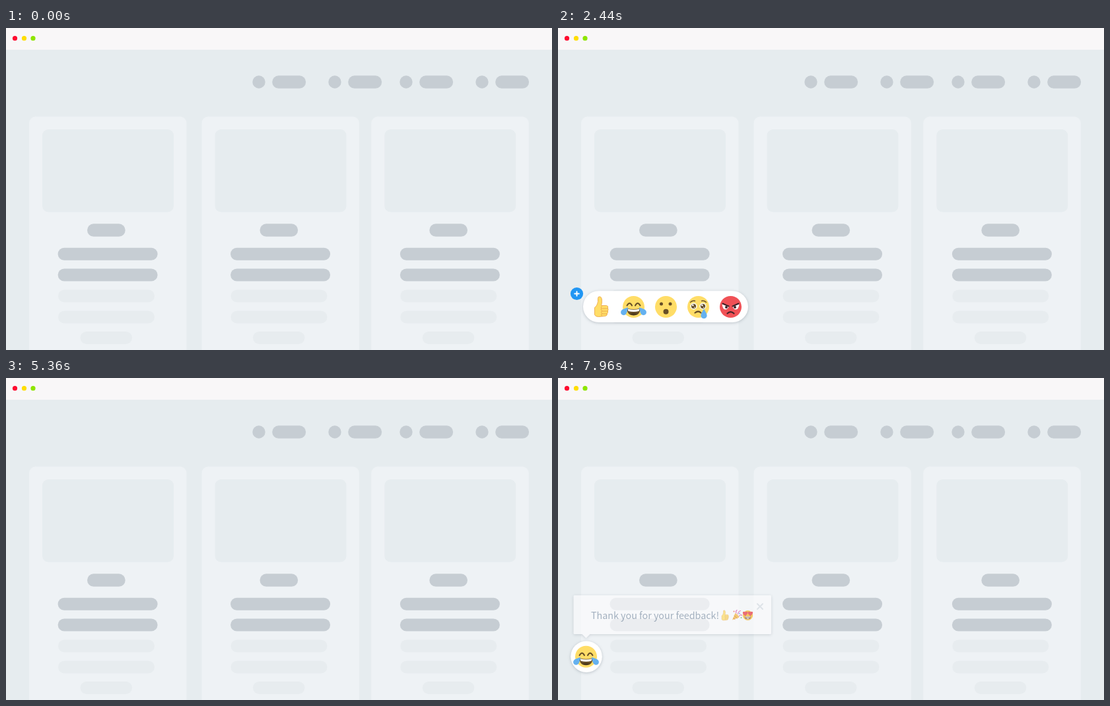
An HTML page that plays this animation: 827 by 489 pixels, repeating every 8 s.

```html
<!DOCTYPE html>
<html lang="en">
<head>
<meta charset="utf-8">
<title>Emoji feedback</title>
<style>
html, body { margin: 0; width: 100%; height: 100%; overflow: hidden; background: #e6ecef; }
svg { display: block; width: 827px; height: 489px; }
text { font-family: "Noto Sans CJK SC", "Noto Sans CJK JP", "Noto Sans CJK KR", "Noto Sans CJK", "Open Sans", sans-serif; font-size: 14.3px; fill: #8596a9; white-space: pre; }
.typed { font-size: 13px; }
.button { font-size: 12.2px; font-weight: 600; fill: #fff; }
.raised { filter: drop-shadow(0 1px 2px rgba(60, 75, 90, .28)); }
</style>
</head>
<body>
<svg id="stage" viewBox="0 0 827 489" xmlns="http://www.w3.org/2000/svg"></svg>
<script>
const LOOP = 8000, TICK = 40;
const NAME = 'Mia Lin', EMAIL = 'mialin@nomail.invalid';

const rect = (x, y, w, h, fill, r = 0) =>
  `<rect x="${x}" y="${y}" width="${w}" height="${h}" rx="${r}" fill="${fill}"/>`;
const pill = (x, y, w, h, fill) => rect(x, y, w, h, fill, h / 2);
const disc = (x, y, r, fill) => `<circle cx="${x}" cy="${y}" r="${r}" fill="${fill}"/>`;
const shape = (d, fill) => `<path d="${d}" fill="${fill}"/>`;
const line = (d, color, width = 1.6) =>
  `<path d="${d}" fill="none" stroke="${color}" stroke-width="${width}" stroke-linecap="round" stroke-linejoin="round"/>`;
const at = (x, y, body, scale = 1, id = '') =>
  `<g ${id && `id="${id}"`} transform="translate(${x} ${y}) scale(${scale})">${body}</g>`;
const label = (x, y, body, attrs = '') => `<text x="${x}" y="${y}" ${attrs}>${body}</text>`;

// Emoji are drawn around their own centre, about 33 px wide
const BROWN = '#664e27', INK = '#2c3038', FLAT = '#ffdd67', BLUE = '#65b1ef';
const face = (fill, body, r = 16.5) => disc(0, 0, r, fill) + body;
const heart = (x, y, scale, fill) =>
  at(x, y, shape('M0 7C-11 0-7-8 0-3.5C7-8 11 0 0 7Z', fill), scale);
const grin = (color, tongue) =>
  shape('M-10 2Q0 5 10 2Q10 13 0 13Q-10 13-10 2Z', color) +
  shape('M-9 3Q0 5.5 9 3L8 6.5Q0 8.5-8 6.5Z', '#fff') +
  shape('M-6 11Q0 7.5 6 11Q0 14.5-6 11Z', tongue);
const tearDrop = (x, y, scale, fill, turn = 0) =>
  `<g transform="translate(${x} ${y}) rotate(${turn}) scale(${scale})">${shape('M0-7C2-3 4.4 0 4.4 3A4.4 4.4 0 0 1-4.4 3C-4.4 0-2-3 0-7Z', fill)}</g>`;
const closedEyes = color => line('M-10-2Q-6-9-2.5-2M2.5-2Q6-9 10-2', color, 2);
const tears = fill => tearDrop(-13, 6, 1, fill, 42) + tearDrop(13, 6, 1, fill, -42);
const love = (fill, red, mouth, tongue, r) =>
  face(fill, heart(-8.5, -7, 1.2, red) + heart(8.5, -7, 1.2, red) + grin(mouth, tongue), r);
const laugh = (fill, color, tongue, drop, r) =>
  face(fill, closedEyes(color) + grin(color, tongue) + tears(drop), r);
const wetEyes = (color, r) => [-7, 7].map(x =>
  disc(x, -1, r, '#fff') + disc(x, -1, r * .72, color) + disc(x - 1.2, -2.4, 1.3, '#fff') + disc(x + 1.2, .8, .8, '#fff')).join('');
const cry = (fill, color, drop, r) =>
  face(fill, wetEyes(color, 5) + line('M-12-7Q-9-10-5-9M5-9Q9-10 12-7', color, 1.3) +
    line('M-5 9Q0 5 4 9', color, 2.2) + tearDrop(8.5, 10, 1.05, drop), r);
const glare = color =>
  shape('M-13-4L-3-1Q-4 4-8 4Q-12 4-13-4ZM13-4L3-1Q4 4 8 4Q12 4 13-4Z', '#fff') +
  disc(-6.5, .5, 2, color) + disc(6.5, .5, 2, color) + line('M-12-5L-3-1M12-5L3-1', color, 2);
const openEyes = (y, r) => disc(-7, y, r, BROWN) + disc(6.5, y, r, BROWN);

const thumb = () =>
  `<g stroke="#eba94f" stroke-width=".9" stroke-linejoin="round">` +
  shape('M-10 1C-7-1-6-4-5-8L-5-13Q-5-16-2-15.5Q1-15 1-9Q1-5 0-2L8-2Q11-1.5 10 2Q11 4 10 6Q10.5 9 9 10Q9 14 6 14L-4 15Q-9 15-10 12Z', FLAT) +
  `</g>` + line('M1 2.5H10M1 6.5H10M1 10.5H9M1-1Q-1 0 0 2Q-1 4 1 6Q-1 8 1 10Q-1 12 1 14', '#eba94f', 1);
const arm = () =>
  shape('M-13 10Q-11-3-9-12Q-4-16 1-11Q1-6-4-7L-4 2Q4-5 10 0Q18 7 14 13Q2 18-13 14Z', '#fdbd3b') +
  line('M-5 3Q-2 7 2 6', '#d98e22', 1.6);
const popper = () =>
  shape('M-14 15L-5-6Q5 0 7 7Z', '#f5b73c') + line('M-8 2L1 10M-11 9L-6 13', '#d9782c', 2) +
  line('M-2-6Q-5-11 0-15M3-3Q4-11 11-13M7 3Q11-3 15 1', '#d95bb0', 2.4) +
  disc(8, -5, 2, '#58a7e8') + disc(-9, -11, 2, '#ee5a54') + disc(13, 8, 2, '#67bd5b');

const SHINY = 'url(#gold)', loveSmall = love('#fbb829', '#ec3843', '#6b3821', '#fff');
const flatLaugh = laugh(FLAT, BROWN, '#4c3a1c', BLUE);
const sets = [
  [
    love(SHINY, '#f3223c', INK, '#ee4c5a', 17),
    laugh(SHINY, INK, '#ee4c5a', '#5cc4f2', 17),
    face(SHINY, disc(-7, -3, 5.8, '#fff') + disc(7, -3, 5.8, '#fff') + disc(-7, -3, 2.5, INK) + disc(7, -3, 2.5, INK) +
      line('M-12-10Q-9-13-5-12M5-12Q9-13 12-10', '#8c5a1c', 1.3) +
      `<ellipse cy="9" rx="5" ry="6" fill="${INK}"/>` + shape('M-3.5 12Q0 8 3.5 12Q0 16-3.5 12Z', '#ee4c5a'), 17),
    cry(SHINY, INK, '#4bbdf0', 17),
    face('url(#rage)', glare(INK) + at(0, 8, rect(-16, -5, 32, 10, INK, 2) +
      label(0, 3, '#%@$!', 'text-anchor="middle" style="font-size:8px;font-weight:700;fill:#fff"'), 1), 17)
  ],
  [
    love(FLAT, '#ee4655', BROWN, '#ff717f'),
    face(FLAT, openEyes(-4, 2.6) + line('M-8 5Q0 13 8 5', BROWN, 2)),
    face(FLAT, openEyes(-4, 2.6) + line('M-6 7H6', BROWN, 2)),
    face(FLAT, openEyes(-4, 2.6) + line('M-7 10Q0 3 7 10', BROWN, 2)),
    face('#f0575b', openEyes(-1, 2.6) + line('M-11-7L-4-4M11-7L4-4M-6 10Q0 4 6 10', '#40262c', 2))
  ],
  [
    thumb(),
    flatLaugh,
    face(FLAT, openEyes(-4.5, 2.5) + disc(0, 7.3, 4, BROWN)),
    cry(FLAT, BROWN, BLUE),
    face('#f05156', glare('#40242a') + line('M-5 10Q0 5 5 10', '#40242a', 2.2))
  ]
];

const slotX = i => 65.5 + 49 * i;
const slots = sets.map((set, s) => `<g id="set${s}">` + set.map((emoji, i) =>
  at(slotX(i) - (s ? 0 : 1), s ? 423.5 : 422.7, emoji, 1, `emoji${s}${i}`)).join('') + '</g>').join('');

const DARK = '#c6cdd3', PALE = '#e7ecef', CARD = '#eef2f5';
const card = x => at(x, 0,
  rect(35, 134.5, 238.5, 380, CARD, 10) + rect(55, 154, 199, 125.5, '#e6ecef', 9) +
  pill(123, 297.3, 57.7, 19.5, DARK) + pill(78.6, 333.7, 151, 19, DARK) + pill(78.6, 365.5, 151, 19, DARK) +
  pill(79, 397.5, 146, 19, PALE) + pill(79, 429.5, 146, 19, PALE) + pill(112.5, 461, 78.5, 19, PALE));
const navItem = x => disc(x, 82, 9.7, DARK) + pill(x + 20.2, 72.3, 51, 19.5, DARK);
const page = rect(0, 0, 827, 489, '#e6ecef') + rect(0, 0, 827, 33, '#f9f7f8') +
  disc(13.5, 15.7, 3.6, '#ff0a2f') + disc(27.5, 15.7, 3.6, '#ffde00') + disc(41, 15.7, 3.6, '#8ee500') +
  [383, 498, 606, 721].map(navItem).join('') + [0, 261.5, 518.3].map(card).join('');

const panel = (y, h, pointer) => `<g class="raised">` + rect(23.5, y, 299.5, h, '#fbfbfd', 1.5) +
  (pointer ? shape('M35.5 388L42.5 395L49.5 388Z', '#fbfbfd') : '') + '</g>';
const close = y => line(`M302 ${y - 4}l8 8m0-8l-8 8`, '#d8dee3', 2);
const rule = (x, y, w) => rect(x, y, w, 6, '#e6edef', 1);

const askPopup = panel(283.5, 100, false) + close(302) +
  label(43, 309, 'Give us your feedback emoji!') + at(245.7, 304, loveSmall, .46) + at(261.5, 303.5, arm(), .47) +
  [319, 332, 345].map(y => rule(43, y, 260)).join('') + rule(43, 358, 200);
const newsPopup = panel(190, 199, true) + close(207) +
  label(32, 231.5, 'Like our post? Subscribe to our newsletter') + rule(43, 241, 260) + rule(73, 254, 200) +
  rect(49, 292.3, 245, 1.4, '#dde1e4') + rect(49, 330.3, 245, 1.4, '#dde1e4') +
  label(50, 283, '', 'id="name" class="typed"') + label(50, 321, '', 'id="email" class="typed"') +
  rect(48.3, 341, 245.4, 36, '#36a5f8', 2) + label(171, 363.8, 'SUBSCRIBE', 'class="button" text-anchor="middle"');
const thanksPopup = panel(330, 59, true) + close(347) + label(50, 365.5, 'Thank you for your feedback!') +
  at(253, 360.5, thumb(), .5) + at(271, 360, popper(), .5) + at(287.5, 360.5, loveSmall, .46);
const bar = `<g class="raised">${pill(38, 399.3, 250, 47.7, '#fff')}</g>` +
  disc(28.5, 403.5, 9.6, '#2196f3') + line('M25.2 403.5h6.6M28.5 400.2v6.6', '#fff', 1.9) + slots;
const bubble = `<g class="raised">${disc(0, 0, 23.8, '#fff')}</g>` + at(-.5, 0, flatLaugh);
const arrow = '<path d="M0 0V15L3.6 11.8L6 17.4L8.6 16.3L6.2 10.8H11Z" fill="#222" stroke="#fff"/>';

document.getElementById('stage').innerHTML = `<defs>
  <radialGradient id="gold" cy=".4"><stop offset=".4" stop-color="#ffd93b"/><stop offset="1" stop-color="#f8b723"/></radialGradient>
  <radialGradient id="rage" cy=".4"><stop offset=".4" stop-color="#ff5254"/><stop offset="1" stop-color="#e8333f"/></radialGradient>
  </defs>${page}<g id="ask">${askPopup}</g><g id="bar">${bar}</g><g id="news">${newsPopup}</g>
  <g id="thanks">${thanksPopup}</g><g id="bubble">${bubble}</g><g id="cursor">${arrow}</g>`;

const el = id => document.getElementById(id);
const progress = (t, from, to) => Math.min(1, Math.max(0, (t - from) / (to - from)));
const outExpo = p => p >= 1 ? 1 : 1 - 2 ** (-10 * p);
const outQuad = p => 1 - (1 - p) ** 2;
const smooth = p => p * p * (3 - 2 * p);
const mix = (a, b, p) => a + (b - a) * p;
const show = (id, on, opacity = 1) => {
  el(id).style.display = on ? '' : 'none';
  el(id).style.opacity = opacity;
};
const move = (id, x, y, scale = 1) =>
  el(id).setAttribute('transform', `translate(${x} ${y}) scale(${scale})`);

// Enter from below at the right, sweep left, settle on the second emoji
function cursorAt(t) {
  const enter = smooth(progress(t, 3840, 4080));
  const sweep = smooth(progress(t, 4080, 4400));
  const back = smooth(progress(t, 4400, 4680));
  return [mix(mix(mix(250, 262, enter), 60, sweep), 114.5, back), mix(489, 430, enter)];
}

function render(t) {
  show('bar', t >= 480 && t < 5360);
  move('bar', 0, 110 * (1 - outExpo(progress(t, 440, 960))));
  show('set0', t < 1440);
  show('set1', t >= 1440 && t < 2440);
  show('set2', t >= 2440);

  const ask = progress(t, 2880, 3320);
  show('ask', t >= 2920 && t < 5360, outQuad(ask));
  move('ask', 0, 60 * (1 - outExpo(ask)));

  const [cx, cy] = cursorAt(t);
  show('cursor', t >= 3880 && t < 5360);
  move('cursor', cx, cy);
  const lift = 28 * outQuad(progress(t, 4680, 4960));
  for (let i = 0; i < 5; i++) {
    const near = Math.max(0, 1 - Math.abs(cx - slotX(i)) / 40) * progress(cy, 470, 432);
    move('emoji2' + i, slotX(i), 423.5 - (i === 1 ? lift : 0), 1 + .2 * near);
  }

  const pop = progress(t, 5360, 5760);
  show('bubble', t >= 5400, outQuad(pop));
  move('bubble', 43, 423.2, 2 - outExpo(pop));

  show('news', t >= 5720 && t < 7760, outQuad(progress(t, 5720, 6200)));
  const typed = Math.max(0, Math.floor((t - 6160) / TICK));
  el('name').textContent = NAME.slice(0, typed);
  el('email').textContent = EMAIL.slice(0, Math.max(0, typed - NAME.length));
  show('thanks', t >= 7760, outQuad(progress(t, 7740, 8220)));
}

const start = performance.now();
function frame() {
  const t = (performance.now() - start) % LOOP;
  render(Math.floor(t / TICK) * TICK);
  requestAnimationFrame(frame);
}
frame();
</script>
</body>
</html>
```
